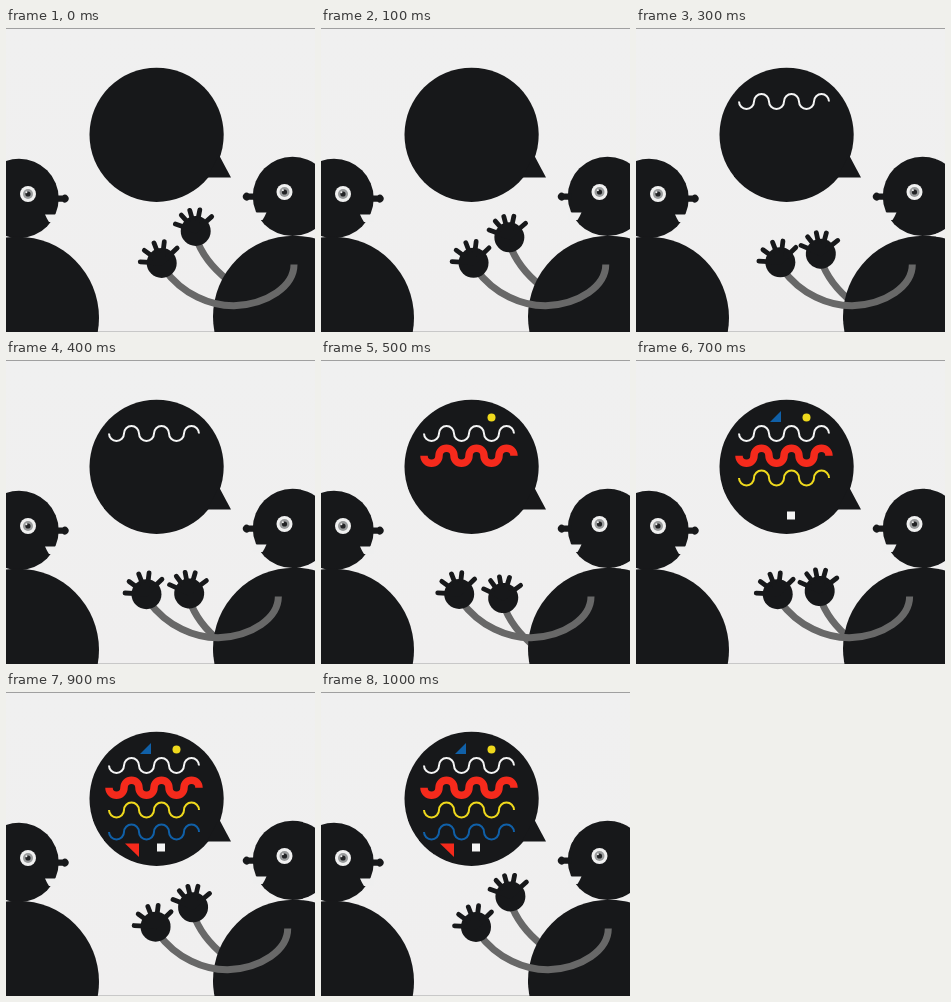
Write an HTML page that moves like this. It is 309 px wide and 304 px high and loops after 1100 ms.

```html
<!DOCTYPE html>
<html lang="en">
<head>
<meta charset="utf-8">
<title>Conversation</title>
<style>
  html, body { margin: 0; width: 100%; height: 100%; overflow: hidden; background: #efefef; }
  svg { display: block; width: 100vw; height: 100vh; }
  .ink { fill: #17181a; }
  .arm { fill: none; stroke: #686868; stroke-width: 7; }
  .fingers { stroke: #17181a; stroke-width: 4.8; stroke-linecap: round; }
  .wave { fill: none; stroke-width: 2; }
</style>
</head>
<body>
<svg viewBox="0 0 309 304">
  <defs>
    <linearGradient id="paper" x2="0" y2="1">
      <stop offset="0" stop-color="#f0f0f0"/>
      <stop offset="1" stop-color="#f0efef"/>
    </linearGradient>
    <g id="head">
      <circle class="ink" r="39.7"/>
      <path class="ink" d="M36-3H43.5A3.9 3.9 0 1 1 43.5 3.4H36Z"/>
      <path fill="#efefef" d="M26 16H40V23.5H30Q28 20.5 26 16Z"/>
    </g>
    <g id="eye">
      <circle r="8" fill="#f0f0f0"/>
      <circle r="5" fill="#999b9c"/>
      <circle r="2.6" fill="#222325"/>
      <circle cx="-1.6" cy="-1.8" r="1" fill="#eee"/>
    </g>
  </defs>

  <rect width="309" height="304" fill="url(#paper)"/>
  <rect width="309" height="1" fill="#a0a0a0"/>
  <rect y="303" width="309" height="1" fill="#c8c8c8"/>

  <circle class="ink" cx="150.6" cy="106.8" r="67.1"/>
  <path class="ink" d="M213 127L225 149.5H201Z"/>
  <g id="talk"></g>

  <use href="#head" x="13" y="170.4"/>
  <use href="#eye" x="22" y="166"/>
  <circle class="ink" cx="12" cy="289.7" r="81"/>

  <path class="arm" id="farArm" d="M0 6Q8 30 32 49"/>
  <circle class="ink" cx="288" cy="288.7" r="81"/>
  <use href="#head" transform="translate(286.5 168.4) scale(-1 1)"/>
  <use href="#eye" x="278.5" y="164"/>
  <path class="arm" id="nearArm" d="M158 241C177 267 205 278 228 277.8C262 276 288 258 288 236.5"/>
  <g id="farHand"></g>
  <g id="nearHand"></g>
</svg>
<script>
const STEP = 100, LOOP = 1100;
// How far the arms are raised at each step, 1 = highest.
const LIFT = [1, .82, .58, .35, .13, 0, .06, .2, .42, .65, .96];
const NS = "http://www.w3.org/2000/svg";
const el = id => document.getElementById(id);

function add(parent, tag, attrs) {
  const node = document.createElementNS(NS, tag);
  for (const key in attrs) node.setAttribute(key, attrs[key]);
  return parent.appendChild(node);
}

function makeHand(group, angles) {
  add(group, "circle", { class: "ink", r: 15 });
  const d = angles.map(a => {
    const r = a * Math.PI / 180;
    return `M0 0L${21.5 * Math.cos(r)} ${21.5 * Math.sin(r)}`;
  }).join("");
  add(group, "path", { class: "fingers", d });
}

// Six half circles in a row, the first one hanging down.
function wave(y, stroke, width = 2) {
  let d = `M103 ${y}`;
  for (let i = 0; i < 6; i++) d += `a7.5 7.5 0 0 ${i % 2} 15 0`;
  return ["path", { class: "wave", d, stroke, style: `stroke-width:${width}` }];
}

const RED = "#f52a1c", YELLOW = "#efd91d", BLUE = "#1060a8", WHITE = "#f4f4f4";
const parts = [
  [300, ...wave(73.5, WHITE)],
  [500, ...wave(95.7, RED, 7.5)],
  [500, "circle", { cx: 170.5, cy: 57.5, r: 4, fill: YELLOW }],
  [600, ...wave(118, YELLOW)],
  [700, "path", { d: "M145 51V62H134Z", fill: BLUE }],
  [700, "rect", { x: 151, y: 151.5, width: 8, height: 8, fill: WHITE }],
  [800, ...wave(140, BLUE)],
  [900, "path", { d: "M119 151.5H133V165Z", fill: RED }]
].map(([start, tag, attrs]) => ({ start, node: add(el("talk"), tag, attrs) }));

makeHand(el("nearHand"), [-177, -144, -111, -83, -44]);
makeHand(el("farHand"), [-161, -132, -106, -79, -42]);

function place(id, x, y, turn = 0) {
  el(id).setAttribute("transform", `translate(${x} ${y}) rotate(${turn})`);
}

function draw(time) {
  const step = Math.floor(time % LOOP / STEP);
  const lift = LIFT[step], drop = 1 - lift;
  const farX = 189.7 - 7.5 * drop, farY = 203 + 35 * drop;
  place("farArm", farX, farY);
  place("farHand", farX, farY, 6 * drop);
  place("nearArm", -18 * drop, 0);
  place("nearHand", 155.7 - 17.5 * drop, 235 - drop);
  for (const { start, node } of parts)
    node.style.visibility = step * STEP >= start ? "visible" : "hidden";
}

const begin = performance.now();
function tick() {
  draw(performance.now() - begin);
  requestAnimationFrame(tick);
}
tick();
</script>
</body>
</html>
```
